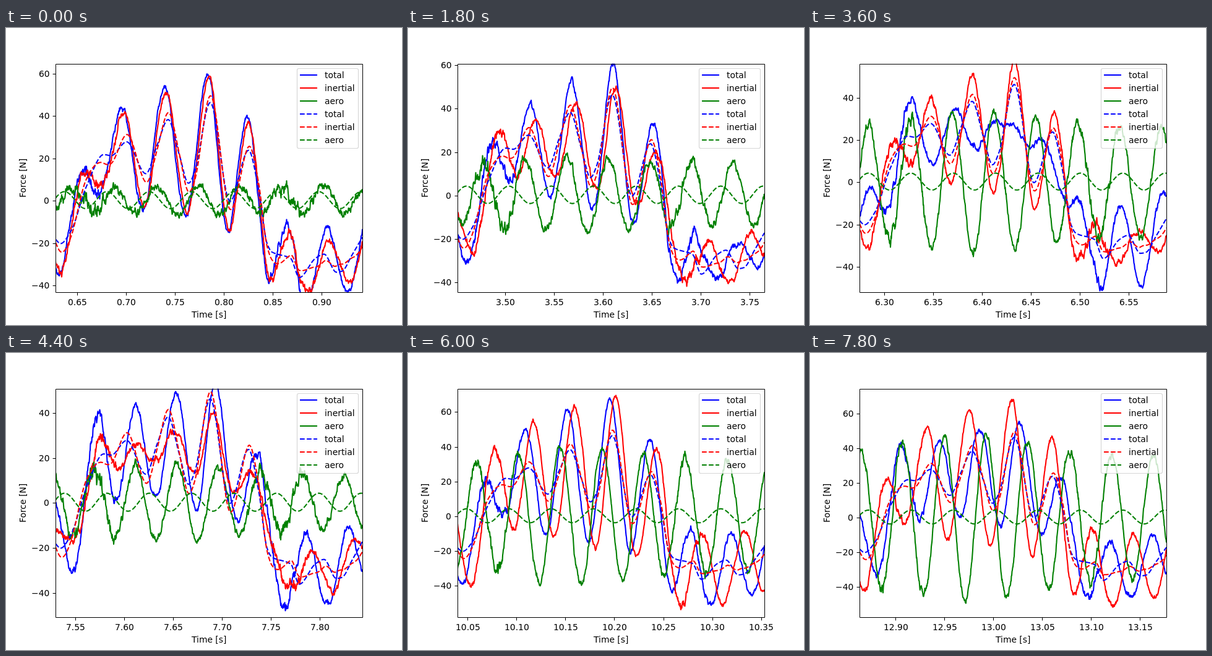
An HTML page with a canvas that plays this animation: 640 px wide and 480 px high, repeating every 8000 ms.

```html
<!DOCTYPE html>
<html lang="en">
<head>
<meta charset="utf-8">
<title>Force per cycle</title>
<style>
html, body { margin: 0; width: 100%; height: 100%; overflow: hidden; background: #fff; }
canvas { display: block; }
</style>
</head>
<body>
<canvas id="stage" width="640" height="480"></canvas>
<script>
const ctx = document.getElementById('stage').getContext('2d');
const LEFT = 80, RIGHT = 576, TOP = 57.6, BOTTOM = 427.2;
const STEP_MS = 200, STEPS = 40, PERIOD = 0.31373;
const FONT = '13.89px "DejaVu Sans", sans-serif';
const COLORS = ['#00f', '#f00', '#008000'];
const NAMES = ['total', 'inertial', 'aero'];

const SAMPLES_PER_PX = 2;
const xs = Array.from({ length: (RIGHT - LEFT) * SAMPLES_PER_PX + 1 },
  (_, i) => LEFT + i / SAMPLES_PER_PX);

const bump = (x, center, width) => Math.exp(-(((x - center) / width) ** 2));
const wave = (x, crest, length) => Math.cos(2 * Math.PI * (x - crest) / length);
const difference = (a, b) => a.map((v, i) => v - b[i]);

// Monotone cubic through [x, y] points.
function smoothCurve(points) {
  const slope = i => (points[i + 1][1] - points[i][1]) / (points[i + 1][0] - points[i][0]);
  const tangents = points.map((_, i) => {
    if (i === 0) return slope(0);
    if (i === points.length - 1) return slope(i - 1);
    const a = slope(i - 1), b = slope(i);
    return a * b > 0 ? 2 * a * b / (a + b) : 0;
  });
  return x => {
    const i = Math.max(0, points.findIndex(p => p[0] >= x) - 1);
    const [[x0, y0], [x1, y1]] = points.slice(i, i + 2);
    const h = x1 - x0, u = (x - x0) / h, v = 1 - u;
    return v * v * (1 + 2 * u) * y0 + u * u * (1 + 2 * v) * y1 +
      h * u * v * (v * tangents[i] - u * tangents[i + 1]);
  };
}

const meanTotal = xs.map(smoothCurve([
  [80, -18], [88, -20], [105, -14], [130, 7], [158, 22], [170, 21.5], [195, 28], [226, 13],
  [245, 27], [262, 38.5], [280, 22], [295, 8.5], [305, 14], [330, 46.5], [362, 0], [392, 24],
  [408, 6], [422, -20], [430, -24], [460, -27], [474, -36], [500, -27], [514, -25], [534, -33.5],
  [543, -33], [560, -25], [576, -17]]));
const meanAero = xs.map(x => 0.5 + 4 * wave(x, 300, 68.5));
const meanInertial = difference(meanTotal, meanAero);
const means = [meanTotal, meanInertial, meanAero];

// Each cycle swings around the mean; size and crest of the swing drift between these poses.
const POSES = [
  { step: 0, low: -43, high: 64.9, total: [17, 320], inertial: [12, 321] },
  { step: 9, low: -44.4, high: 60.9, total: [14, 334], inertial: [13, 350] },
  { step: 18, low: -52, high: 56.4, total: [18, 365], inertial: [8, 330] },
  { step: 22, low: -50.8, high: 51.1, total: [22, 348], inertial: [12, 358] },
  { step: 30, low: -57.9, high: 73.6, total: [22, 323], inertial: [25, 341] },
  { step: 34, low: -59.2, high: 53.5, total: [21, 308], inertial: [25, 303] },
  { step: 39, low: -57.4, high: 74.6, total: [23, 280], inertial: [22, 321] }
];

function poseAt(step) {
  const next = Math.max(1, POSES.findIndex(p => p.step >= step));
  const a = POSES[next - 1], b = POSES[next];
  const mix = (from, to) => from + (to - from) * (step - a.step) / (b.step - a.step);
  const mixSwing = key => a[key].map((v, i) => mix(v, b[key][i]));
  return {
    low: mix(a.low, b.low), high: mix(a.high, b.high),
    total: mixSwing('total'), inertial: mixSwing('inertial')
  };
}

function makeRandom(seed) {
  return () => {
    seed = (seed + 0x6D2B79F5) | 0;
    let t = Math.imul(seed ^ (seed >>> 15), 1 | seed);
    t = (t + Math.imul(t ^ (t >>> 7), 61 | t)) ^ t;
    return ((t ^ (t >>> 14)) >>> 0) / 4294967296;
  };
}

function measured(mean, [size, crest], seed) {
  const random = makeRandom(seed);
  let noise = 0;
  return xs.map((x, i) => {
    noise = 0.7 * noise + random() - random();
    const envelope = 0.85 + 0.27 * bump(x, 270, 130);
    const roughness = 1.2 + 1.3 * bump(x, 140, 40) + 1.2 * bump(x, 450, 40);
    return mean[i] + size * envelope * wave(x, crest, 67.5) + roughness * noise;
  });
}

function stroke(color, width, dashed, trace) {
  ctx.strokeStyle = color;
  ctx.lineWidth = width;
  ctx.lineJoin = 'round';
  ctx.setLineDash(dashed ? [7.7, 3.33] : []);
  ctx.beginPath();
  trace();
  ctx.stroke();
}

function line(x1, y1, x2, y2, color = '#000', width = 1, dashed = false) {
  stroke(color, width, dashed, () => { ctx.moveTo(x1, y1); ctx.lineTo(x2, y2); });
}

// Places text on whole pixels; anchor is 0 for left, 0.5 for centre, 1 for right.
function text(label, x, y, anchor = 0.5) {
  ctx.fillStyle = '#000';
  ctx.font = FONT;
  ctx.fillText(label, Math.round(x - anchor * ctx.measureText(label).width), y);
}

function drawLegend() {
  ctx.setLineDash([]);
  ctx.fillStyle = 'rgba(255,255,255,.8)';
  ctx.strokeStyle = 'rgba(204,204,204,.8)';
  ctx.lineWidth = 1.2;
  ctx.beginPath();
  ctx.roundRect(470.5, 65.5, 99, 129, 2.8);
  ctx.fill();
  ctx.stroke();
  for (let i = 0; i < 6; i++) {
    const y = 76 + 21 * i;
    line(475, y, 503, y, COLORS[i % 3], 2.08, i > 2);
    text(NAMES[i % 3], 515, y + 5, 0);
  }
}

function drawAxes(start, low, high, toY) {
  for (let k = Math.ceil(start * 20); k / 20 <= start + PERIOD; k++) {
    const x = LEFT + (k / 20 - start) / PERIOD * (RIGHT - LEFT);
    const snapped = Math.floor(x) + 0.5;
    line(snapped, 427.5, snapped, 432.4);
    text((k / 20).toFixed(2), x, 448);
  }
  for (let v = Math.ceil(low / 20) * 20; v <= high; v += 20) {
    const y = Math.floor(toY(v));
    line(75.6, y + 0.5, 80.5, y + 0.5);
    text(v < 0 ? '\u2212' + -v : String(Math.abs(v)), 70.3, y + 5, 1);
  }
  stroke('#000', 1, false, () => ctx.rect(80.5, 58.5, 496, 369));
  text('Time [s]', 328, 468);
  ctx.save();
  ctx.translate(32, 242);
  ctx.rotate(-Math.PI / 2);
  text('Force [N]', 0, 0);
  ctx.restore();
}

function draw(step) {
  const { low, high, total, inertial } = poseAt(step);
  const toY = v => BOTTOM - (v - low) / (high - low) * (BOTTOM - TOP);
  const totalForce = measured(meanTotal, total, step * 2 + 1);
  const inertialForce = measured(meanInertial, inertial, step * 2 + 2);
  const aeroForce = difference(totalForce, inertialForce);

  ctx.fillStyle = '#fff';
  ctx.fillRect(0, 0, 640, 480);
  ctx.save();
  ctx.beginPath();
  ctx.rect(LEFT, TOP, RIGHT - LEFT, BOTTOM - TOP);
  ctx.clip();
  [totalForce, inertialForce, aeroForce, ...means].forEach((values, n) =>
    stroke(COLORS[n % 3], 2.08, n > 2, () =>
      values.forEach((v, i) => ctx.lineTo(xs[i], toY(v)))));
  ctx.restore();
  drawAxes((step + 2) * PERIOD, low, high, toY);
  drawLegend();
}

let shown = -1;
function tick() {
  const step = Math.floor(performance.now() / STEP_MS) % STEPS;
  if (step !== shown) draw(shown = step);
  requestAnimationFrame(tick);
}
tick();
</script>
</body>
</html>
```
